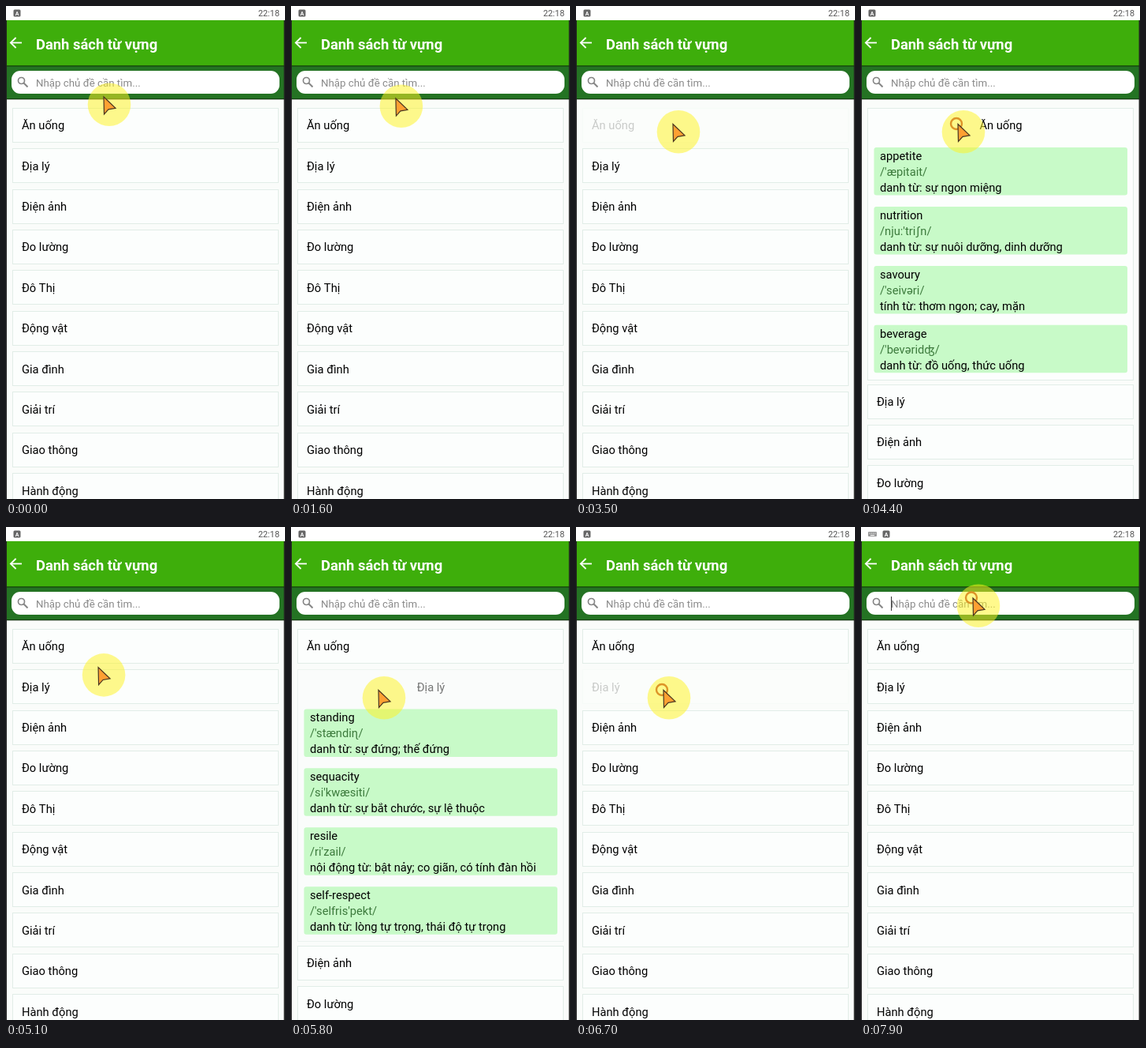
These frames come from a looping animation (354 px wide and 624 px high, 8000 ms). An HTML page with a canvas:

```html
<!DOCTYPE html>
<html lang="vi">
<head>
<meta charset="utf-8">
<style>
  html, body { margin: 0; width: 100%; height: 100%; overflow: hidden; background: #fff; }
  canvas { display: block; }
</style>
</head>
<body>
<canvas id="stage" width="354" height="624"></canvas>
<script>
const ctx = document.getElementById('stage').getContext('2d');
const W = 354, H = 624, LOOP = 8000;
const ROW_TOP = 129, ROW_STEP = 51.35, ROW_H = 43.5, EXTRA = 298.2;
const RING_TIME = 300;

const topics = ['Ăn uống', 'Địa lý', 'Điện ảnh', 'Đo lường', 'Đô Thị', 'Động vật',
  'Gia đình', 'Giải trí', 'Giao thông', 'Hành động'];

const words = [
  [
    ['appetite', "/'æpitait/", 'danh từ: sự ngon miệng'],
    ['nutrition', "/nju:'triʃn/", 'danh từ: sự nuôi dưỡng, dinh dưỡng'],
    ['savoury', "/'seivəri/", 'tính từ: thơm ngon; cay, mặn'],
    ['beverage', "/'bevəridʤ/", 'danh từ: đồ uống, thức uống']
  ],
  [
    ['standing', "/'stændiɳ/", 'danh từ: sự đứng; thế đứng'],
    ['sequacity', "/si'kwæsiti/", 'danh từ: sự bắt chước, sự lệ thuộc'],
    ['resile', "/ri'zail/", 'nội động từ: bật nảy; co giãn, có tính đàn hồi'],
    ['self-respect', "/'selfris'pekt/", 'danh từ: lòng tự trọng, thái độ tự trọng']
  ]
];

// A tap shows a ring and dims its row on press, and toggles it on release.
const taps = [
  { row: 0, press: 3050, release: 3590 },
  { row: 0, press: 4400, release: 4590 },
  { row: 1, press: 5400, release: 5690 },
  { row: 1, press: 6500, release: 6690 }
];
const focusTap = { press: 7750, release: 7790 };

// Pointer moves: start, end, and the tip positions passed at even times between them.
const start = [124, 115];
const moves = [
  { from: 850, to: 1200, points: [[136, 107]] },
  { from: 1500, to: 2300, points: [[123, 149.5]] },
  { from: 5000, to: 5350, points: [[111, 206.5]] },
  { from: 6850, to: 7650, points: [[142, 90]] }
].map(m => ({ ...m, end: m.points[0] }));

const clamp = v => Math.max(0, Math.min(1, v));
const ease = v => v * v * (3 - 2 * v);
const easeOut = v => 1 - (1 - v) ** 2;

function pointerAt(t) {
  let [x, y] = start;
  for (const { from, to, end } of moves) {
    const k = easeOut(clamp((t - from) / (to - from)));
    x += (end[0] - x) * k;
    y += (end[1] - y) * k;
  }
  return [x, y];
}

function openRow(t) {
  let open = -1;
  for (const { row, release } of taps) {
    if (t >= release) open = open === row ? -1 : row;
  }
  return open;
}

function rowOpacity(row, t) {
  const tap = taps.find(p => p.row === row && t >= p.press && t < p.release + 250);
  if (!tap) return 1;
  return t < tap.release
    ? 1 - 0.8 * ease(clamp((t - tap.press) / 150))
    : 0.2 + 0.8 * ease(clamp((t - tap.release) / 250));
}

function rect(x, y, w, h, color) {
  ctx.fillStyle = color;
  ctx.fillRect(x, y, w, h);
}

function rounded(x, y, w, h, r, color) {
  ctx.fillStyle = color;
  ctx.beginPath();
  ctx.roundRect(x, y, w, h, r);
  ctx.fill();
}

function text(str, x, y, size, color, weight = 400, align = 'left') {
  ctx.font = `${weight} ${size}px Roboto, sans-serif`;
  ctx.fillStyle = color;
  ctx.textAlign = align;
  ctx.fillText(str, x, Math.round(y));
}

function circle(x, y, r) {
  ctx.beginPath();
  ctx.arc(x, y, r, 0, Math.PI * 2);
}

function line(points, color, width) {
  ctx.strokeStyle = color;
  ctx.lineWidth = width;
  ctx.beginPath();
  points.forEach(([x, y]) => ctx.lineTo(x, y));
  ctx.stroke();
}

function drawStatus(focused) {
  rect(0, 0, W, 18, '#fff');
  const x = focused ? 27.5 : 9.5;
  rounded(x, 4.5, 9, 9, 1.5, '#666');
  text('A', x + 4.5, 12, 7, '#fff', 700, 'center');
  if (focused) {
    rounded(9, 6, 11, 6, 1, '#999');
    for (let i = 0; i < 4; i++) rect(10.5 + i * 2.3, 7.5, 1, 1, '#fff');
    rect(12, 10, 5, 1, '#fff');
  }
  text('22:18', 347, 13, 10.9, '#555', 400, 'right');
}

function drawHeader(focused) {
  rect(0, 18, W, 58, '#3eae0b');
  rect(0, 76, W, 42, '#247323');
  rect(0, 75.4, W, 1, '#0b2a08');
  rect(0, 117.3, W, 1, '#0b2a08');
  line([[20, 46.5], [6, 46.5]], '#fff', 1.8);
  line([[12.6, 40], [5.9, 46.5], [12.6, 53]], '#fff', 1.8);
  text('Danh sách từ vựng', 38, 55, 18.4, '#fff', 700);

  rounded(7, 82, 340, 29, 11, '#fff');
  ctx.strokeStyle = '#858585';
  ctx.lineWidth = 1.7;
  circle(19.5, 94.5, 4);
  ctx.stroke();
  line([[22.5, 97.5], [27.5, 102.5]], '#858585', 2);
  text('Nhập chủ đề cần tìm...', 38, 102, 13.3, '#8a8a8a');
  if (focused) rect(38, 88, 1, 18, '#333');
}

function drawWord([word, sound, meaning], y) {
  rounded(16.5, y - 0.5, 321.5, 60.5, 3, '#c8fac8');
  text(word, 24, y + 15.3, 14.7, '#000');
  text(sound, 24, y + 35.3, 14.7, '#3c7a3c');
  text(meaning, 24, y + 55.3, 14.7, '#000');
}

function drawList(t) {
  const open = openRow(t);
  let y = ROW_TOP;
  topics.forEach((topic, i) => {
    const isOpen = i === open;
    const height = ROW_H + (isOpen ? EXTRA + 3 : 0);
    const baseline = y + 27.4;
    ctx.globalAlpha = rowOpacity(i, t);
    rect(8, y, 338, height, '#fcfefd');
    ctx.strokeStyle = '#e1ede7';
    ctx.lineWidth = 1;
    ctx.strokeRect(8.5, Math.round(y) + 0.5, 337, Math.round(height) - 1);
    if (isOpen) text(topic, 177.5, baseline, 14.7, '#000', 400, 'center');
    else text(topic, 20, baseline, 14.7, '#000');
    ctx.globalAlpha = 1;
    if (isOpen) words[i].forEach((entry, k) => drawWord(entry, y + 50.6 + k * 74.9));
    y += ROW_STEP + (isOpen ? EXTRA : 0);
  });
}

function drawPointer(t) {
  const [x, y] = pointerAt(t);
  ctx.fillStyle = 'rgba(255, 243, 35, 0.52)';
  circle(x + 7, y + 9.7, 27.3);
  ctx.fill();

  if ([...taps, focusTap].some(p => t >= p.press && t < p.press + RING_TIME)) {
    ctx.strokeStyle = '#dd9428';
    ctx.lineWidth = 2.4;
    circle(x - 2, y - 0.5, 7);
    ctx.stroke();
  }

  ctx.beginPath();
  for (const [dx, dy] of [[0, 0], [0.5, 22], [6, 15.8], [15, 14.3]]) ctx.lineTo(x + dx, y + dy);
  ctx.closePath();
  ctx.fillStyle = '#ffa032';
  ctx.fill();
  ctx.strokeStyle = '#4a3520';
  ctx.lineWidth = 1.2;
  ctx.stroke();
}

function render(t) {
  const focused = t >= focusTap.release;
  rect(0, 0, W, H, '#fafcfa');
  drawList(t);
  drawStatus(focused);
  drawHeader(focused);
  rect(0, 18, 1, H, '#222');
  rect(W - 1.4, 18, 1.4, H, '#222');
  drawPointer(t);
}

function tick() {
  render(performance.now() % LOOP);
  requestAnimationFrame(tick);
}
tick();
</script>
</body>
</html>
```
